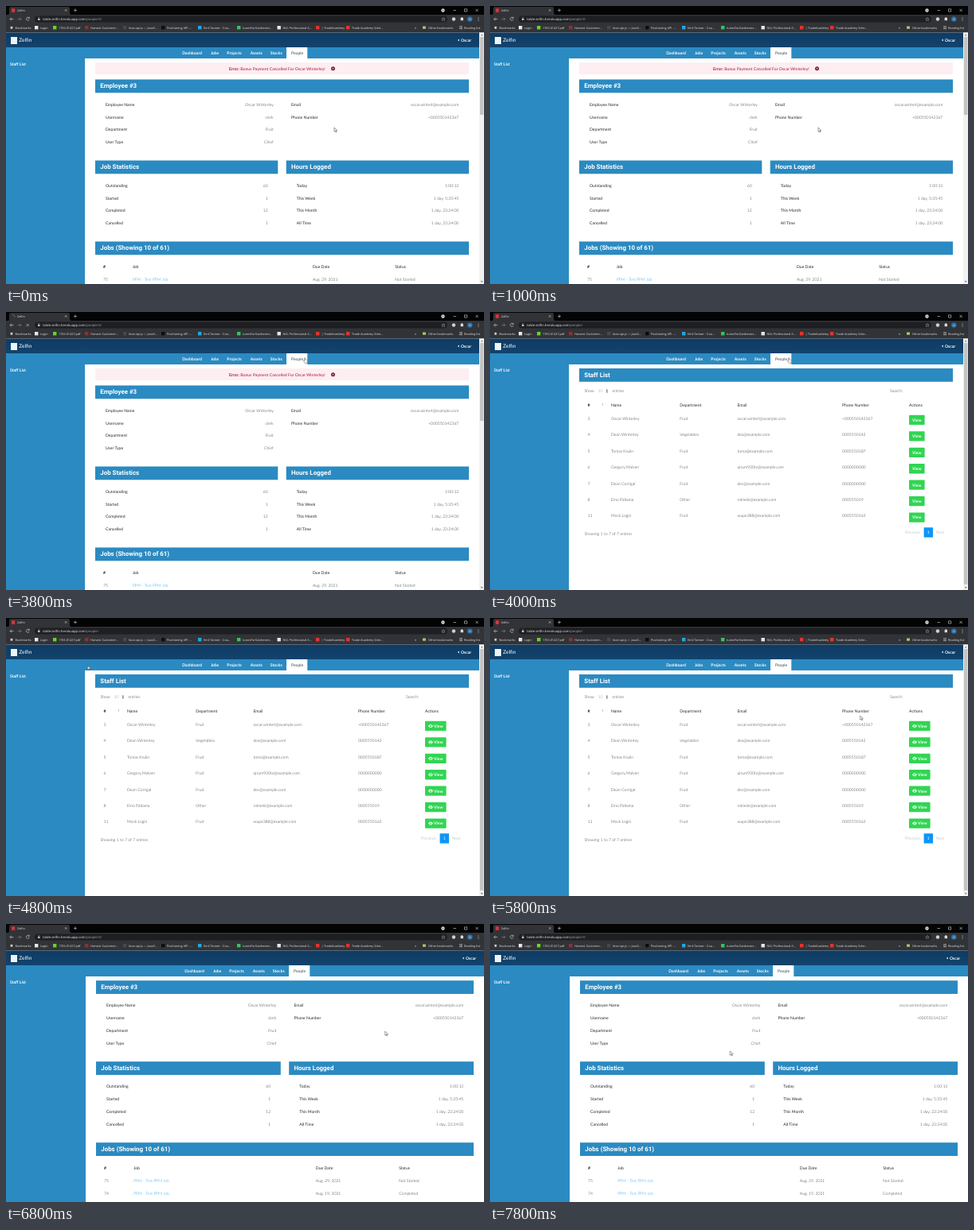
Animation of 600x350 px, one loop 8000 ms. Source, as an HTML page:

```html
<!DOCTYPE html>
<html lang="en">
<head>
<meta charset="utf-8">
<title>Staff records</title>
<style>
html, body { margin: 0; width: 100%; height: 100%; overflow: hidden; background: #fff; }
svg { display: block; width: 600px; height: 350px; text-rendering: geometricPrecision; }
text { font-family: Lato, sans-serif; white-space: pre; }
.ui { font-family: "Open Sans", sans-serif; }
.title { font-family: Roboto, sans-serif; font-weight: 700; }
.bold { font-weight: 700; }
.light { font-weight: 300; }
.end { text-anchor: end; }
.mid { text-anchor: middle; }

.first, .list, .last, .load, .plain, .full, .hover, .arrow, .hand {
  animation: 8s step-end infinite;
}
.first { animation-name: first; }
.list { animation-name: list; }
.last { animation-name: last; }
.load { animation-name: load; }
.plain { animation-name: plain; }
.full { animation-name: full; }
.hover { animation-name: hover; }
.arrow { animation-name: arrow; }
.hand { animation-name: hand; }
.cursor { animation: move 8s step-end infinite; }

@keyframes first { 0% { opacity: 1 } 50%, 100% { opacity: 0 } }
@keyframes list { 0% { opacity: 0 } 50% { opacity: 1 } 85%, 100% { opacity: 0 } }
@keyframes last { 0% { opacity: 0 } 85%, 100% { opacity: 1 } }
@keyframes load {
  0% { opacity: 0 } 47.5% { opacity: 1 } 50% { opacity: 0 }
  80% { opacity: 1 } 85%, 100% { opacity: 0 }
}
@keyframes plain { 0% { opacity: 0 } 50% { opacity: 1 } 52.5%, 100% { opacity: 0 } }
@keyframes full { 0% { opacity: 0 } 52.5%, 100% { opacity: 1 } }
@keyframes hover { 0% { opacity: 0 } 75% { opacity: 1 } 85%, 100% { opacity: 0 } }
@keyframes arrow {
  0% { opacity: 1 } 45% { opacity: 0 } 57.5% { opacity: 1 }
  75% { opacity: 0 } 85%, 100% { opacity: 1 }
}
@keyframes hand {
  0% { opacity: 0 } 45% { opacity: 1 } 57.5% { opacity: 0 }
  75% { opacity: 1 } 85%, 100% { opacity: 0 }
}
/* the screen refreshes every 200 ms */
@keyframes move {
  0% { transform: translate(412px, 153px) }
  30% { transform: translate(412px, 153px); animation-timing-function: steps(6) }
  45% { transform: translate(375px, 57.5px) }
  50% { transform: translate(375px, 57.5px); animation-timing-function: steps(4) }
  60% { transform: translate(102.5px, 60px); animation-timing-function: steps(6) }
  75% { transform: translate(537px, 135.5px) }
  82.5% { transform: translate(537px, 135.5px); animation-timing-function: steps(3) }
  90% { transform: translate(353px, 134px); animation-timing-function: steps(3) }
  97.5%, 100% { transform: translate(301.3px, 160px) }
}
</style>
</head>
<body>
<svg id="stage" viewBox="0 0 600 350"></svg>
<script>
const BLUE = '#2b8ac1', INK = '#24282c', GREEN = '#31d552';

const rect = (x, y, w, h, fill, more = '') =>
  `<rect x="${x}" y="${y}" width="${w}" height="${h}" fill="${fill}" ${more}/>`;
const dot = (x, y, r, fill) => `<circle cx="${x}" cy="${y}" r="${r}" fill="${fill}"/>`;
const line = (d, color = '#d5d7da', width = 0.6) =>
  `<path d="${d}" fill="none" stroke="${color}" stroke-width="${width}"/>`;
const group = (cls, ...parts) => `<g class="${cls}">${parts.join('')}</g>`;
// y is the middle of the line
const text = (x, y, s, cls = '', fill = INK, size = 5.1) =>
  `<text x="${x}" y="${y + size * 0.35}" class="${cls}" fill="${fill}" font-size="${size}">${s}</text>`;
const ui = (x, y, s, size = 3.8, fill = '#dfe1e5') => text(x, y, s, 'ui', fill, size);

const bookmarks = [
  [38, '#e8e8e8', 'Login'], [61, '#62d62c', '1706.01427.pdf'],
  [101, '#8d2f38', 'Harvest Customer...'], [149, '#45484d', 'face-api.js — JavaS...'],
  [197, '#0d0d0f', 'Positioning API -...'], [243, '#21a7df', 'Emil Tanner - Coa...'],
  [292, '#2fc65c', 'tunesForGardeners...'], [342.5, '#e3e6ea', 'NVL Professional A...'],
  [391, '#e2342f', '| TradeAcademy'], [429, '#e2342f', 'Trade Academy Sche...']
];

function browser() {
  const bar = '#323337';
  return [
    rect(0, 0, 600, 34, bar),
    rect(0, 0, 600, 11, '#040405'),
    `<path d="M2 11Q4 11 4 9V3Q4 1 6 1H78Q80 1 80 3V9Q80 11 82 11Z" fill="${bar}"/>`,
    rect(7, 3.2, 4.2, 4.6, '#d9333b'),
    ui(14, 5.4, 'Zelfin', 3.8),
    line('M74 4.2l2.4 2.4m0-2.4l-2.4 2.4M87 3.4v4M85 5.4h4'),
    dot(548.5, 5.5, 2.2, '#d8d8d8'),
    line('M547.5 5l1 1 1-1', '#111', 0.5),
    line('M561.5 5.5h3.6M575.5 3.8h3.2v3.2h-3.2zM589.5 3.8l3.2 3.2m0-3.2l-3.2 3.2'),
    line('M9.5 16.5H5m2-2l-2 2 2 2'),
    line('M14.5 16.5H19m-2-2l2 2-2 2', '#85888c'),
    line('M29 15a2 2 0 1 0 .3 2M29.3 13.7v1.7h-1.7'),
    rect(36, 12.6, 518, 8, '#1e1f22', 'rx="4"'),
    rect(40, 15.8, 2.6, 2.2, '#b9bcc0'),
    line('M40.5 16v-1a.8.8 0 0 1 1.6 0v1', '#b9bcc0', 0.4),
    line('M549 14.4l.6 1.5 1.6.1-1.2 1 .4 1.6-1.4-.9-1.4.9.4-1.6-1.2-1 1.6-.1z', '#c6c9cc', 0.4),
    dot(562, 16.5, 2.2, '#cfd2d5'),
    rect(570.6, 15, 3.4, 3.2, '#d6d8da'), dot(572.3, 14.8, 0.9, '#d6d8da'),
    dot(582.3, 16.5, 3.3, '#2470a8'), text(582.3, 16.5, 'O', 'ui mid', '#fff', 3.6),
    ...[14.8, 16.5, 18.2].map(y => dot(593, y, 0.5, '#d5d7da')),
    `<path d="M7 25l.6 1.5 1.6.1-1.2 1 .4 1.6-1.4-.9-1.4.9.4-1.6-1.2-1 1.6-.1z" fill="#dfe1e5"/>`,
    ui(11.5, 27.2, 'Bookmarks'),
    ...bookmarks.map(([x, color, label]) =>
      rect(x - 2, 25, 4.4, 4.4, color) + ui(x + 5, 27.2, label)),
    ui(513, 27, '»', 4.5),
    rect(523, 25.4, 4, 3.4, '#9ccb62', 'rx=".4"'), ui(530, 27.2, 'Other bookmarks'),
    line('M569 25.7h4M569 27.2h4M569 28.7h4'), ui(575, 27.2, 'Reading list')
  ].join('');
}

function loading() {
  return group('load',
    rect(6, 2.4, 6.2, 6.4, '#323337'), line('M8 4a2 2 0 0 1 2.8 2.6', '#9aa0a6'),
    rect(24, 13, 7, 7, '#323337'), line('M25.5 14.8l3.4 3.4m0-3.4l-3.4 3.4'));
}

// page header, menu and side column for a page of width w
function frame(w, path) {
  const mid = w / 2 + 49.5, shift = (w - 594) / 2;
  const nav = [[221.3, 'Dashboard'], [257, 'Jobs'], [277.3, 'Projects'], [306.8, 'Assets'], [331.8, 'Stocks']];
  const side = w / 6;
  return [
    text(46, 16.5, `tolde-zelfin.herokuapp.com<tspan fill="#9aa0a6">/people/${path}</tspan>`, 'ui', '#eceef0', 4.2),
    rect(0, 33.5, 600, 316.5, '#fff'),
    rect(0, 33.5, w, 19, 'url(#head)'),
    rect(0, 52, w, 14, BLUE),
    rect(0, 66, side, 284, BLUE),
    rect(6, 39, 8, 9, '#eef4f8'),
    text(16.3, 43, 'Zelfin', '', '#fff', 6.5),
    `<path d="M${w - 25.3} 41.6v3l-1.8-1.5z" fill="#fff"/>`,
    text(w - 9.8, 43.2, 'Oscar', 'bold end', '#fff'),
    ...nav.map(([x, s]) => text(x + shift, 59.2, s, 'bold', '#fff')),
    rect(352 + shift, 52, 26.3, 14, '#fff'),
    text(358 + shift, 59.2, 'People', '', '#3c4a55'),
    text(5, 73, 'Staff List', 'bold', '#fff')
  ].join('');
}

const scrollbar = length => rect(594, 33.5, 6, 316.5, '#f1f1f1') +
  rect(595, 39, 4.4, length, '#c3c3c3') +
  `<path d="M595.8 37.3l1.4-1.6 1.4 1.6zM595.8 346.3l1.4 1.6 1.4-1.6z" fill="#606060"/>`;

const heading = (x, y, w, s) => rect(x, y, w, 16.8, BLUE) + text(x + 6.3, y + 8.2, s, 'title', '#fff', 7.9);

const rows = (pairs, x, end, y) => pairs.map(([k, v], i) =>
  text(x, y + i * 15.9, k) + text(end, y + i * 15.9, v, 'light end')).join('');

// employee details, with the first panel at height y
function employee(w, y) {
  const left = w / 6 + 13, wide = w - 13 - left, mid = left + wide / 2;
  const half = wide / 2 - 5.2, right = mid + 5.2;
  const cols = [left + 10, left + wide * 0.0995, left + wide * 0.582, left + wide * 0.802];
  const jobs = [['75', 'Aug. 29, 2021', 'Not Started'], ['74', 'Aug. 19, 2021', 'Completed']];
  return [
    heading(left, y, wide, 'Employee #3'),
    rows([['Employee Name', 'Oscar Winterley'], ['Username', 'clerk'], ['Department', 'Fruit'], ['User Type', 'Chief']],
      left + 13, mid - 10.7, y + 31.4),
    rows([['Email', 'oscar.winterl@example.com'], ['Phone Number', '+000550142367']],
      mid + 11.5, w - 25.7, y + 31.4),
    heading(left, y + 102, half, 'Job Statistics'),
    rows([['Outstanding', '60'], ['Started', '1'], ['Completed', '12'], ['Cancelled', '1']],
      left + 13, mid - 17.8, y + 133.4),
    heading(right, y + 102, half, 'Hours Logged'),
    rows([['Today', '1:00:13'], ['This Week', '1 day, 5:35:45'], ['This Month', '1 day, 23:24:00'], ['All Time', '1 day, 23:24:00']],
      mid + 18.3, w - 25.7, y + 133.4),
    heading(left, y + 204, wide, 'Jobs (Showing 10 of 61)'),
    ...['#', 'Job', 'Due Date', 'Status'].map((s, i) => text(cols[i], y + 235.6, s, i ? '' : 'bold')),
    ...jobs.map(([id, due, status], i) => [id, 'PPM - Test PPM Job', due, status].map((s, c) =>
      text(cols[c], y + 252 + i * 15.7, s, 'light', c === 1 ? '#1b9cf2' : INK)).join(''))
  ].join('');
}

const banner = rect(112, 71, 469, 15, '#fdeef2') +
  text(280, 78.8, '<tspan font-weight="700">Error:</tspan> Bonus Payment Cancelled For Oscar Winterley!', '', '#ad1740', 5.15) +
  dot(410.5, 78.7, 2.5, '#6d1730') + line('M409.5 77.7l2 2m0-2l-2 2', '#fff', 0.7);

const staff = [
  ['3', 'Oscar Winterley', 'Fruit', 'oscar.winterl@example.com', '+000550142367'],
  ['4', 'Dean Winterley', 'Vegetables', 'dea@example.com', '0005550142'],
  ['5', 'Tomas Krulin', 'Fruit', 'toma@example.com', '0005550187'],
  ['6', 'Gregory Malven', 'Fruit', 'qirum930tz@example.com', '0000000000'],
  ['7', 'Dean Corrigal', 'Fruit', 'dec@example.com', '0000000000'],
  ['8', 'Eino Paltama', 'Other', 'rolmeki@example.com', '000555019'],
  ['11', 'Mock Login', 'Fruit', 'wupe388@example.com', '0005550163']
];

function viewButton(y, fill) {
  return rect(526, y - 4.2, 26.6, 12.3, fill, 'rx=".8"') +
    `<path d="M530 ${y + 2}q3-4.2 6 0q-3 4.2-6 0z" fill="#fff"/>` +
    dot(533, y + 2, 1.2, fill) + dot(533, y + 2, 0.6, '#fff') +
    text(537, y + 2, 'View', 'bold', '#fff');
}

function staffList() {
  const cols = [122.5, 152, 238.3, 310.5, 442, 526], grey = '#9a9da0';
  const rowY = i => 134 + i * 20.43;
  const ys = staff.map((_, i) => rowY(i));
  return [
    heading(112, 71, 469, 'Staff List'),
    text(118.5, 99.5, 'Show', 'light'), text(135.5, 99.5, '10', 'light', '#8a8d90'),
    `<path d="M145.6 99l1.2-1.6 1.2 1.6zM145.6 100l1.2 1.6 1.2-1.6z" fill="#333"/>`,
    text(153.5, 99.5, 'entries', 'light'), text(502, 99.5, 'Search:', 'light'),
    ...['#', 'Name', 'Department', 'Email', 'Phone Number', 'Actions'].map((s, i) =>
      text(cols[i], 117.5, s, i ? '' : 'bold')),
    line('M141.5 118v-2.6m-.7.8l.7-.8.7.8', '#777', 0.35),
    ...staff.map((row, i) => row.map((s, c) => text(cols[c], rowY(i), s, 'light')).join('')),
    group('plain', ...ys.map(y => rect(526, y - 4.2, 19.6, 12.3, GREEN, 'rx=".8"') +
      text(535.8, y + 2, 'View', 'bold mid', '#fff'))),
    group('full', ...ys.map(y => viewButton(y, GREEN))),
    group('hover', viewButton(134, '#25a93f')),
    text(118.5, 279, 'Showing 1 to 7 of 7 entries', 'light'),
    text(521, 277.6, 'Previous', 'light', grey),
    rect(544.6, 271.3, 11.4, 12.4, '#0d96f7'), text(550.3, 277.6, '1', 'mid', '#fff'),
    text(559.8, 277.6, 'Next', 'light', grey)
  ].join('');
}

const pointer = group('cursor',
  group('arrow', `<path d="M0 0V5.2L1.3 4.1 2.1 6 3 5.6 2.2 3.8H3.8Z" fill="#fff" stroke="#222" stroke-width=".45"/>`),
  group('hand', `<path d="M-.4 .5Q.2-.3.8.5V2.6L3 3.1Q3.8 3.4 3.6 4.4L3 6.8H.3L-1.6 4.2Q-1.5 3.2-.4 4Z" fill="#fff" stroke="#222" stroke-width=".45"/>`));

document.getElementById('stage').innerHTML =
  `<defs><linearGradient id="head" x2="0" y2="1">
    <stop stop-color="#0f3b62"/><stop offset="1" stop-color="#11446f"/></linearGradient></defs>` +
  browser() +
  group('first', frame(594, '3/'), banner, employee(594, 92.5), scrollbar(98)) +
  group('list', frame(594, ''), staffList(), scrollbar(304)) +
  group('last', frame(600, '3/'), employee(600, 71.2)) +
  loading() + pointer;
</script>
</body>
</html>
```
